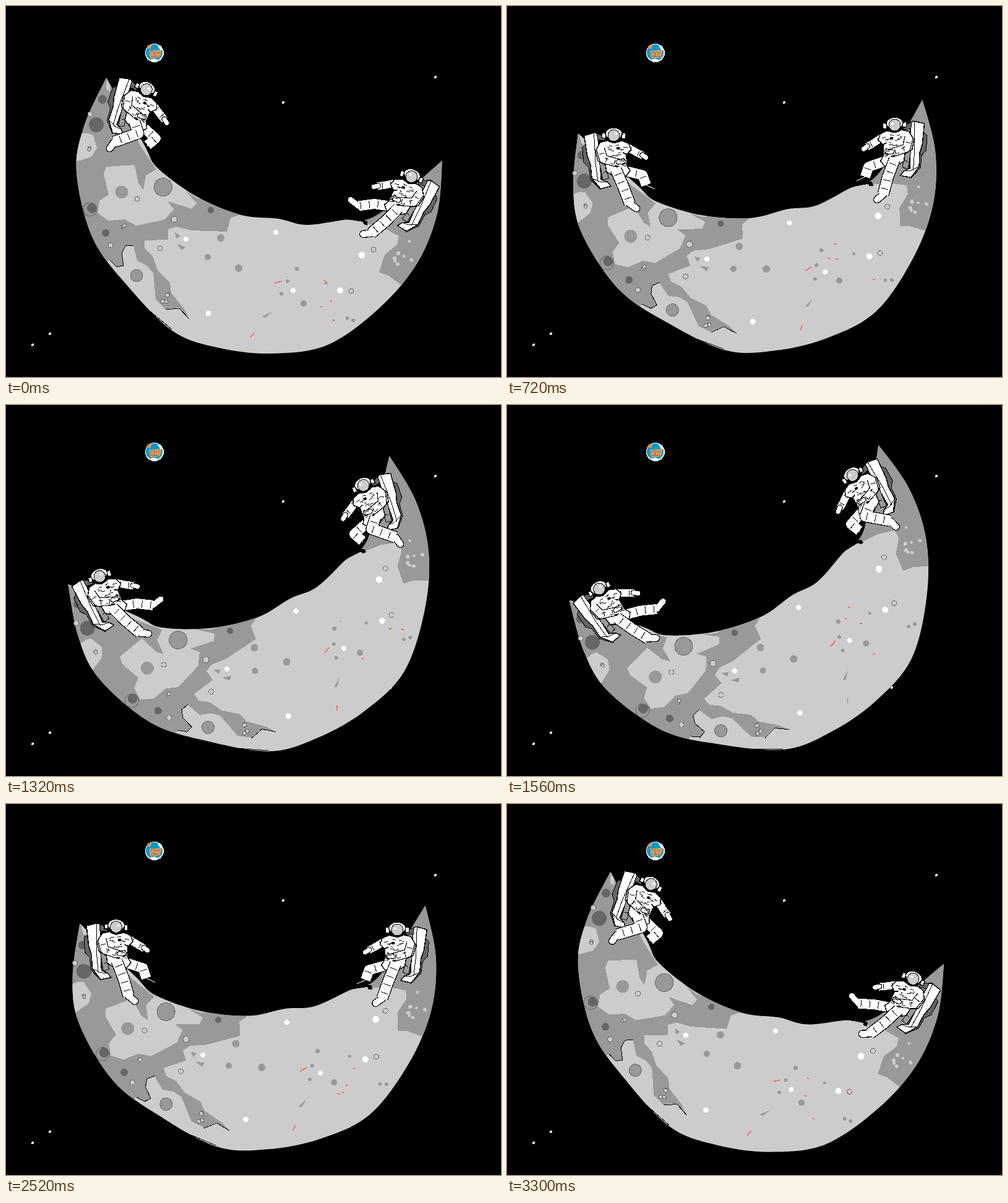
An HTML page that plays this animation: 800x600 px, repeating every 3.36 s.

```html
<!DOCTYPE html>
<html lang="en">
<head>
<meta charset="utf-8">
<title>Moon seesaw</title>
<style>
  html, body { margin: 0; width: 100%; height: 100%; overflow: hidden; background: #000; }
  svg { display: block; width: 100%; height: 100%; shape-rendering: crispEdges; }
  .line { fill: none; stroke: #000; stroke-width: 1; }
  .limb { fill: none; stroke-linejoin: round; }
  .suit { fill: #fff; stroke: #000; stroke-width: 1.5; }
  .mid { fill: #999; }
  .light { fill: #ccc; }
</style>
</head>
<body>
<svg viewBox="0 0 800 600">
  <defs><clipPath id="edge"><path id="rim"/></clipPath></defs>
  <rect width="800" height="600"/>
  <g fill="#fff">
    <circle cx="694" cy="115" r="2"/><circle cx="448" cy="156" r="2"/>
    <circle cx="71" cy="530" r="2"/><circle cx="43" cy="548" r="2"/>
    <circle cx="622" cy="457" r="2"/>
  </g>

  <g id="earth">
    <circle cx="240" cy="76" r="15" fill="#fff"/>
    <circle cx="239.5" cy="75.5" r="13.5" fill="#09c"/>
    <path fill="#fff" d="M244 62 L254 70 L249 71Z M232 87 L240 85 L248 88 L240 91Z"/>
    <path fill="#c96" d="M226 69 L230 63 L235 63 L234 69Z M231 72 L252 71 L249 83 L233 85Z"/>
    <path class="line" style="stroke:#964" d="M233 74 H237 M239 74 V81 M242 75 H248 M234 81 H247"/>
  </g>

  <g id="moon">
    <g clip-path="url(#edge)">
      <rect class="light" x="100" y="100" width="620" height="480"/>
      <path class="mid" d="M100 100 V440 L168 411 L179 422 L190 420 L187 400 L193 388 L206 388 L212 412 L228 420
        L238 432 L242 475 L258 490 L280 488 L296 506 L288 490 L267 464 L265 448 L245 427 L237 405 L224 392 L224 379
        L262 378 L262 361 L275 357 L300 363 L357 365 L363 343 L400 330 L308 311 L244 266 L217 226 L166 118Z"/>
      <path class="mid" d="M720 230 V420 L640 452 L618 436 L603 431 L612 402 L632 386 L635 372 L610 359 L578 351 L600 325Z"/>
      <path class="light" d="M158 272 L162 260 L208 257 L214 287 L222 298 L226 274 L247 262 L276 283 L308 319 L300 328
        L262 316 L271 329 L256 346 L210 355 L192 345 L166 347 L148 335 L151 315 L166 305Z"/>
      <path class="light" d="M100 206 H134 L141 209 L147 230 L138 244 L100 256Z M163 117 L168 128 V138 L162 134Z"/>
      <path class="mid" d="M273 366 l9 6 l-7 4z M276 384 l14 6 l-6 5z M414 502 l17 -8 l-12 10z"/>
    </g>
    <path d="M545 344 H574 L584 348 V355 L578 353 L577 349Z"/>
    <path class="line" d="M168 411 L179 422 L190 420 L187 400 L193 388 L206 387 M258 491 L280 489 L296 506 M220 483 L268 523"/>
    <g id="craters"></g>
    <g id="sparks" stroke="#f55" stroke-width="1.5"></g>
  </g>

  <g id="left"></g>
  <g id="right"></g>
</svg>
<script>
const $ = id => document.getElementById(id);
const clamp = v => Math.max(0, Math.min(1, v));
const noise = n => { const v = Math.sin(n * 12.9898 + 4) * 43758.5453; return v - Math.floor(v); };
const repeat = (n, f) => Array.from({ length: n }, (_, i) => f(i)).join('');
const points = s => s.split(' ').map(p => p.split(',').map(Number));

// Smooth open curve through the points.
function curve(pts) {
  const p = i => pts[Math.max(0, Math.min(pts.length - 1, i))];
  const handle = (i, side) => p(i).map((v, j) => v + side * (p(i + 1)[j] - p(i - 1)[j]) / 6);
  return repeat(pts.length - 1, i => `C${handle(i, 1)} ${handle(i + 1, -1)} ${p(i + 1)}`);
}

$('rim').setAttribute('d', 'M162,116' +
  curve(points('162,116 126,195 114,270 140,375 195,451 270,526 345,553 430,562 520,548 605,487 665,415 697,335 705,250')) +
  curve(points('705,250 600,338 545,346 485,354 440,344 380,338 308,308 245,262 222,222 162,116')) + 'Z');

const disc = ([x, y, r]) => `<circle cx="${x}" cy="${y}" r="${r}"/>`;
const paint = (fill, line, inner) => `<g fill="${fill}" stroke="${line}">${inner}</g>`;
const dots = (fill, line, list) => paint(fill, line, points(list).map(disc).join(''));
const scatter = (fill, line, n, seed, x, y, w, h) => paint(fill, line, repeat(n, i => disc(
  [x + w * (noise(seed + i) - .5), y + h * (noise(seed + i + 50) - .5), 2 + 1.2 * noise(seed + i + 90)])));

$('craters').innerHTML =
  dots('none', '#666', '136,329,11 212,312,4') +
  dots('#666', 'none', '146,192,12 156,151,7 139,327,8 161,367,6 331,330,5') +
  dots('#999', '#666', '254,293,14.5 211,436,10') +
  dots('#999', 'none', '187,301,10.5 347,375,6 326,406,5 376,424,6 470,425,3.5 481,481,5') +
  dots('#fff', 'none', '291,377,4 436,366,4 464,460,4 540,460,5 575,403,5.5 327,497,4.5') +
  dots('#ccc', '#666', '272,345,5 249,392,4 169,387,4 594,394,4 558,461,4 136,175,4') +
  scatter('#ccc', '#666', 4, 3, 258, 474, 12, 18) +
  scatter('#ccc', '#666', 2, 12, 190, 357, 14, 6) +
  scatter('#ccc', '#666', 2, 7, 130, 228, 10, 8) +
  scatter('#999', 'none', 5, 20, 480, 470, 170, 80) +
  scatter('#ccc', 'none', 9, 31, 641, 398, 32, 42);

function limb(d, w, cap = 'butt') {
  const stroke = (c, width, more = '') =>
    `<path class="limb" d="${d}" stroke="${c}" stroke-width="${width}" stroke-linecap="${cap}" ${more}/>`;
  return stroke('#000', w + 2.5) + stroke('#fff', w) +
    (cap === 'butt' ? stroke('#000', w * .7, 'stroke-dasharray="1 13" stroke-dashoffset="-8"') : '');
}

const pack = `
  <path fill="#666" stroke="#000" d="M-44 14 L-51 20 L-49 44 L-41 52 L-38 72 L-22 88 L-16 76 L-28 40Z"/>
  <path class="suit" d="M-48 1 L-31 -4 L-26 -2 L-23 40 L-21 72 L-11 76 L-5 83 L-22 87 L-36 70 L-38 48 L-43 34Z"/>
  <path fill="#999" stroke="#000" d="M-24 43 L-15 42 L-9 70 L-18 73Z"/>
  <path fill="#666" stroke="#000" d="M-27 -2 L-14 2 V9 L-26 8Z"/>
  <path class="line" d="M-32 -3 L-30 44 L-26 76 M-36 70 L-22 76 H-11"/>`;

const creases = `<path class="line" d="${repeat(24, i =>
  `M${-18 + 34 * noise(i)} ${17 + 44 * noise(i + 40)} l${3 + 5 * noise(i + 80)} ${6 * noise(i + 120) - 3}`)}"/>`;

const torso = `
  <path class="suit" d="M-22 12 L-6 8 L14 10 L24 14 L28 24 L20 32 L21 50 L26 58 L20 66 L4 69 L-12 60 L-14 48 L-26 42 L-30 26Z"/>
  <path d="M-14 3 L-9 11 L0 14 L11 11 L14 3Z M4 20 h5 v4 h-5z"/>`;

const helmet = `
  <rect class="suit" x="13" y="-3" width="6" height="9"/>
  <rect class="suit" x="-19" y="-3" width="6" height="8"/>
  <ellipse class="suit" cy="-2" rx="13.5" ry="9.5"/>
  <circle cy="1" r="9.5" fill="#ccc" stroke="#000"/>
  <rect x="1" y="-3" width="4" height="3" fill="#fff"/>`;

const body = limb('M20 19 L37 29 L47 34', 12) + limb('M46 33 L52 37', 7, 'round') +
  torso + limb('M-22 22 L-17 39 L8 46', 12) + limb('M7 44 L15 43', 6, 'round') + creases + helmet;

// Chain of [angle from straight down, length] bones.
function chain(from, bones) {
  const pts = [from];
  for (const [deg, len] of bones) {
    const a = deg * Math.PI / 180, [x, y] = pts[pts.length - 1];
    pts.push([x + len * Math.sin(a), y + len * Math.cos(a)]);
  }
  return pts;
}

const path = pts => 'M' + pts.join(' L');

// u is the tilt away from level: positive when this tip is up.
function astronaut(u) {
  const lean = u + .0007 * u ** 3, r = lean * Math.PI / 180;
  const hip = (x, y) => [x * Math.cos(r) - y * Math.sin(r), x * Math.sin(r) + y * Math.cos(r)];
  const tuck = clamp((u - 11) / 8), kick = clamp((-u - 9) / 9);
  const shin = 20 - 1.8 * u - 56 * tuck;
  const farShin = 20 - .5 * u + 65 * kick - 60 * tuck;
  const near = chain(hip(3, 56), [[23 - .8 * u + .03 * u * u, 30 - 10 * tuck], [shin, 30 + 11 * tuck], [shin + 35, 13]]);
  const far = chain(hip(14, 57), [[75 - 1.4 * u, 33 - 5 * kick], [farShin, 17 + 10 * kick], [farShin + 45, 16 - 14 * tuck]]);
  const foot = path(far.slice(2));
  const farBoot = kick > .5 ? limb(foot, 9, 'round')
    : `<path class="limb" stroke="#000" stroke-width="6" d="${foot}"/><path class="limb" stroke="#fff" d="${foot}"/>`;
  const rot = inner => `<g transform="rotate(${lean})">${inner}</g>`;
  return rot(pack) + farBoot + limb(path(far.slice(0, 3)), 16) + rot(body) +
    limb(path(near.slice(2)), 10, 'round') + limb(path(near.slice(0, 3)), 17);
}

function place(id, u, reach, side) {
  const a = (202.4 + 1.07 * u + .003 * u * u) * Math.PI / 180, r = reach - .3 * u;
  const x = 400 + side * r * Math.cos(a), y = 300 + r * Math.sin(a);
  $(id).setAttribute('transform', `translate(${x} ${y}) scale(${side} 1)`);
  $(id).innerHTML = astronaut(u);
}

const spark = (x, y, dx, dy) => `<path d="M${x} ${y} l${dx} ${dy}"/>`;

let shown = -1;
function draw(now) {
  const n = Math.floor(now % 3360 / 60);
  if (n === shown) return;
  shown = n;
  const tilt = Math.max(-1.62 * n, Math.min(1.6, 1.48 * n - 79));
  $('moon').setAttribute('transform', `rotate(${tilt} 401.5 299)`);
  $('sparks').innerHTML = spark(434, 448, 12, -3) + spark(395, 536, 6, -7) + repeat(4, i =>
    spark(470 + 90 * noise(n * 4 + i), 415 + 100 * noise(n * 4 + i + 300), 3, 2));
  place('left', tilt + 19, 245, 1);
  place('right', -16.5 - tilt, 252, -1);
}

const start = performance.now();
function tick() {
  draw(performance.now() - start);
  requestAnimationFrame(tick);
}
tick();
</script>
</body>
</html>
```
